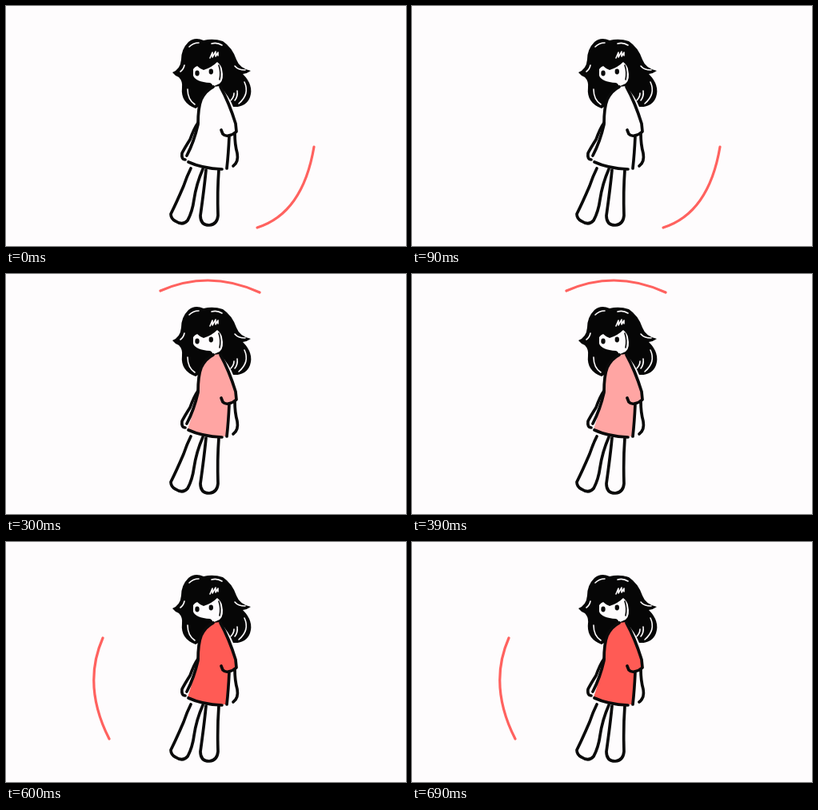
An HTML page that plays this animation: 500 by 300 pixels, repeating every 750 ms.

```html
<!DOCTYPE html>
<html lang="en">
<head>
<meta charset="utf-8">
<title>Girl with circling stroke</title>
<style>
  html, body { margin: 0; width: 100%; height: 100%; overflow: hidden; background: #fefcfd; }
  svg { display: block; width: 100%; height: 100%; }
  path { fill: none; stroke-linecap: round; stroke-linejoin: round; }
  .ink { stroke: #0a0a0a; stroke-width: 3.7; }
  .shine { stroke: #fefcfd; stroke-width: 1.6; }
  .hair { fill: #060606; }
  .skin { fill: #fefcfd; }
  #sweep { stroke: #ff625f; stroke-width: 3.2; }
</style>
</head>
<body>
<svg viewBox="0 0 500 300">
  <!-- hair, face and eyes -->
  <path class="hair" d="M247 43 Q236 38 228 45 Q219 54 219 67 Q218 79 208 83 Q211 87 216 89
    Q221 94 220 102 Q218 121 237 128 Q244 125 250 112 L268 101 Q279 113 284 126
    Q300 127 305 114 Q310 99 296 85 Q302 84 306 81 Q292 78 288 67 Q283 52 271 44 Q259 40 247 43 Z"/>
  <path class="skin" d="M234 79 Q236 76 239 75 Q243 79 247 80 Q257 77 264 70 Q269 74 270 79
    Q273 92 267 97 L258 101 Q259 98 255 96 Q237 95 234 87 Z"/>
  <path class="ink" style="stroke-width:1.6" d="M266 74 Q269 83 267 92"/>
  <ellipse cx="239" cy="84" rx="2.7" ry="3.4" fill="#0a0a0a"/>
  <ellipse cx="256.3" cy="82" rx="2.7" ry="3.4" fill="#0a0a0a"/>
  <path class="shine" d="M229 51 Q234 46 241 46 M257 47 Q264 45 270 49 M218 82 Q222 79 223 74
    M286 75 Q290 80 299 80 M255 65 L258 58 L258 64 L262 57 L262 63 L265 58 L265 62
    M227 104 Q227 117 236 123 M298 95 Q305 110 291 122
    M289 106 Q290 113 286 118 M285 109 Q285 114 281 118"/>

  <!-- dress -->
  <path id="dress" d="M259 101 Q249 106 244 117 Q240 127 240 148 Q234 174 227 194 Q244 203 275 203
    Q278 186 278 162 Q287 161 287 153 Q283 134 268 100 Z"/>
  <path class="ink" d="M259 101 Q249 106 244 117 Q240 127 240 148 Q235 170 226 187 M228 195 Q245 203 270 204
    M268 101 Q279 121 287 147 L288 157 Q284 161 278 162 Q274 163 271 160 L269 155 M279 163 Q278 185 276 203"/>
  <!-- arms -->
  <path class="ink" d="M240 146 Q235 153 230 167 Q223 178 220 184 Q219 192 224 192
    M286 160 Q286 173 289 184 Q291 195 284 200"/>
  <!-- legs -->
  <path class="ink" d="M231 203 Q226 213 222 225 Q213 246 206 260 Q206 266 212 269 Q221 275 227 268
    Q233 257 235 242 Q238 222 246 204
    M250 205 Q248 226 243 262 Q243 274 254 274 Q264 273 265 262 Q264 232 266 205"/>

  <path id="sweep"/>
</svg>
<script>
  const STEP = 150;
  const poses = [
    { dress: "#fefcfd", sweep: "M385 176 Q371 259 314 277" },
    { dress: "#ffc4c2", sweep: "M350 40 Q384 86 382 139" },
    { dress: "#ffa5a3", sweep: "M193 21 Q254 -6 317 23" },
    { dress: "#ff7f7c", sweep: "M161 46 Q121 77 120 122" },
    { dress: "#ff5b55", sweep: "M121 120 Q95 179 129 246" }
  ];
  const dress = document.getElementById("dress");
  const sweep = document.getElementById("sweep");
  const start = performance.now();

  function draw() {
    const elapsed = performance.now() - start;
    const pose = poses[Math.floor(elapsed / STEP) % poses.length];
    dress.style.fill = pose.dress;
    sweep.setAttribute("d", pose.sweep);
    requestAnimationFrame(draw);
  }
  draw();
</script>
</body>
</html>
```
